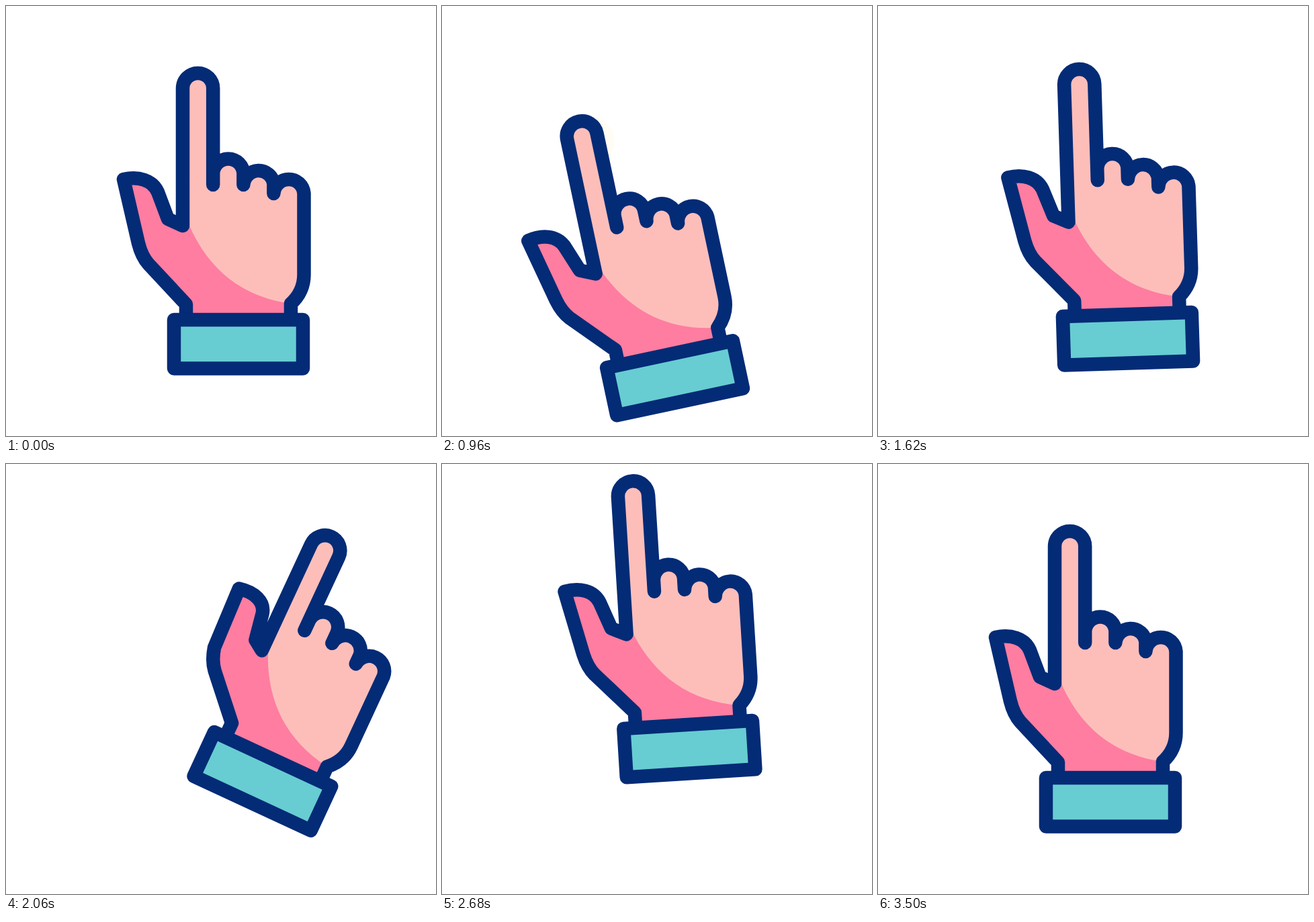
Write an HTML page that moves like this. It is 640x640 px and loops after 3600 ms.

```html
<!DOCTYPE html>
<html>
<head>
<meta charset="utf-8">
<style>
  html, body { margin: 0; width: 100%; height: 100%; overflow: hidden; background: #fff; }
  svg { display: block; width: 100%; height: 100%; }
</style>
</head>
<body>
<svg viewBox="0 0 640 640" fill="none" stroke-linecap="round" stroke-linejoin="round">
  <circle id="ring" stroke="#fecb50"/>
  <g id="hand" stroke="#042b76" stroke-width="20.5">
    <path id="palm" fill="#fdbeba" stroke="none"/>
    <path id="shade" fill="#fe7da0" stroke="none"/>
    <path id="line"/>
    <rect x="250" y="467" width="192" height="72.5" fill="#67cdd2"/>
  </g>
</svg>
<script>
const LOOP = 3600;
const $ = id => document.getElementById(id);
const clamp = v => Math.min(1, Math.max(0, v));
const span = (t, a, b) => clamp((t - a) / (b - a));
const ease = u => u * u * (3 - 2 * u);

// Cuff centre and tilt at each stop
const poses = [[346, 503, 0], [346.5, 553.5, -12], [382, 472, 24.9], [363, 405, -32], [346, 503, 0]];
// Slide start, slide end, turn start, turn end
const moves = [[456, 820, 536, 820], [1360, 1760, 1530, 1790], [2420, 2820, 2550, 2810], [3200, 3500, 3220, 3500]];
const presses = [80, 960, 1980, 2860];
// Start time and centre
const rings = [[120, 286, 122], [956, 219, 201], [2080, 489, 99], [2990, 120, 126]];
const PRESS = 180, RING = 420;

function pose(t) {
  let [x, y, a] = poses[0];
  moves.forEach(([s0, s1, r0, r1], i) => {
    const from = poses[i], to = poses[i + 1];
    const s = ease(span(t, s0, s1)), r = ease(span(t, r0, r1));
    x += (to[0] - from[0]) * s;
    y += (to[1] - from[1]) * s;
    a += (to[2] - from[2]) * r;
  });
  return [x, y, a];
}

// k is how far the finger is pressed, 0 to 1
function drawHand(k) {
  const p = (x, y) => `${x + 0.2 * k * Math.max(0, 353 - y)} ${y} `;
  const tip = 122.6 + 31 * k, d = 7.6 * k;
  const arc = (x, y) => `A22.6 22.6 0 0 1 ${x} ${y} `;
  const thumb = 'L268 444 L212 384 C204 375 200 365 197 353 L' + p(175, 258) +
    'C' + p(197, 253) + p(218, 259) + p(226, 277) + 'L' + p(241, 317) + 'L263 327 ';
  const outline = 'M268 464 ' + thumb + `V${tip} ` + arc(308.2, tip) +
    `V${266 + d} V${250 + d} ` + arc(353.4, 250 + d) +
    `V${266 + d} ` + arc(398.4, 265 + d) +
    `V${279 + d} ` + arc(443.5, 279 + d) +
    'V400 C443.5 418 436 432 424 443 V464';
  $('palm').setAttribute('d', outline);
  $('line').setAttribute('d', outline);
  $('shade').setAttribute('d', 'M268 464 ' + thumb + 'L268 315 C295 385 345 432 424 443 V464 Z');
}

function drawRing(t) {
  const ring = $('ring');
  const hit = rings.find(([s]) => t >= s && t < s + RING);
  if (!hit) return ring.setAttribute('opacity', 0);
  const [start, x, y] = hit, u = (t - start) / RING;
  const outer = 37 + 34 * u, inner = 71 * u;
  const attrs = { cx: x, cy: y, r: (outer + inner) / 2, 'stroke-width': outer - inner, opacity: clamp((t - start) / 60) };
  for (const name in attrs) ring.setAttribute(name, attrs[name]);
}

function frame(now) {
  const t = now % LOOP;
  const [x, y, a] = pose(t);
  $('hand').setAttribute('transform', `translate(${x} ${y}) rotate(${a}) translate(-346 -503)`);
  drawHand(presses.reduce((k, s) => k + Math.sin(Math.PI * span(t, s, s + PRESS)) ** 2, 0));
  drawRing(t);
}

let begin;
function tick(now) {
  begin ??= now;
  frame(now - begin);
  requestAnimationFrame(tick);
}
frame(0);
requestAnimationFrame(tick);
</script>
</body>
</html>
```
